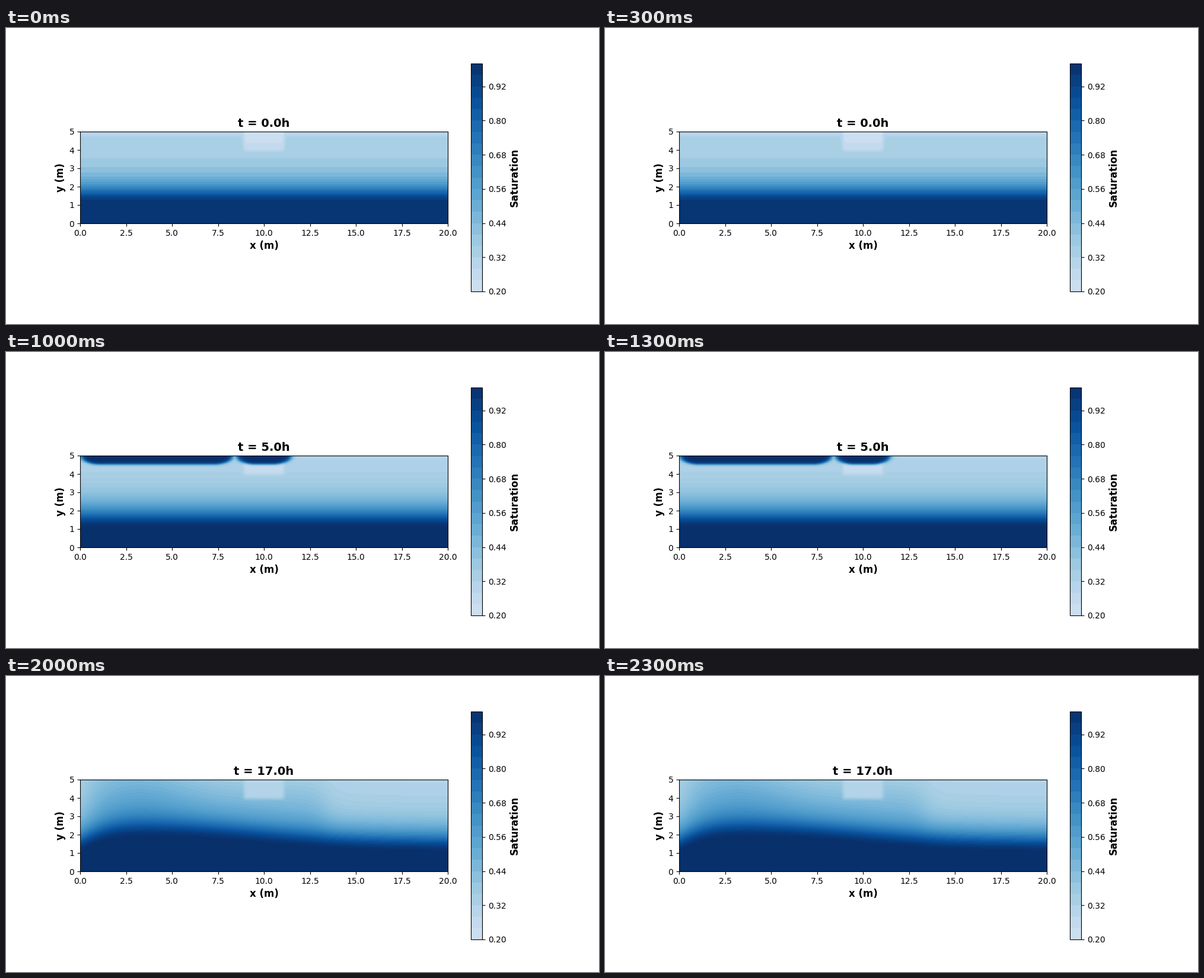
Recreate the animation shown at these times as a matplotlib script. Size 1000 by 500 pixels, loop 2.5 s.

```python
import numpy as np
import matplotlib.pyplot as plt
from matplotlib.animation import FuncAnimation

HOURS = [0, 2, 5, 12, 17]
COARSE = np.linspace(0.20, 1.00, 21)
FINE = np.arange(12, 64) * 0.016
RESIDUAL = 0.294

X, Y = np.meshgrid(np.linspace(0, 20, 401), np.linspace(0, 5, 201))


def step(v, centre, width):
    return 0.5 * (1 + np.tanh((v - centre) / width))


def bump(v, centre, width):
    return np.exp(-((v - centre) / width) ** 2)


def retention(rise=0.0, extra=0.0):
    """Saturation above a water table at 1 m + rise, with extra held water."""
    head = np.maximum(Y - 1 - rise, 0)
    effective = (1 + (0.86 * head) ** 2.2) ** -1.25
    base = RESIDUAL + extra
    return base + (1 - base) * effective


def with_trench(field, filling):
    """Blend in the coarse-grained block below the surface at mid-width."""
    side = np.clip((1.22 - np.abs(X - 10)) / 0.24, 0, 1)
    floor = np.clip((Y - 3.82) / 0.24, 0, 1)
    return field + (filling - field) * side * floor


def surface_drying():
    """Held water fades towards the surface, more so away from the inlet."""
    return 1 - (np.maximum(Y - 3, 0) / 2) ** 2 * (0.3 + 0.3 * step(X, 6, 2))


def wet_zone(centre, half_width, depth=0.46, corner=0.45, squeeze=0.45):
    """Rounded wetting front hanging from the surface, 0..1."""
    qx = (np.abs(X - centre) - half_width) * squeeze + corner
    qy = 5 - Y - depth + corner
    outside = np.hypot(np.maximum(qx, 0), np.maximum(qy, 0))
    distance = outside + np.minimum(np.maximum(qx, qy), 0) - corner
    return 1 - step(distance, 0, 0.08)


def dry(rise=0.0):
    return with_trench(retention(rise), 0.26 - 0.055 * (Y - 4))


def raining():
    wet = np.maximum(wet_zone(4.18, 4.1), wet_zone(10, 1.46))
    field = dry(0.02)
    return field + (1 - field) * wet


def sinking_plume():
    rise = 0.17 * bump(X, 6, 5) + 0.2 * bump(X, 10, 2.5)
    front = 13.1 - 0.5 * bump(Y, 2.3, 0.6)
    held = (0.12 + 0.13 * bump(X, 2, 3.2)) * step(X, 0.25, 0.35)
    held = held * (1 - step(X, front, 0.4)) * surface_drying()
    lens = 0.36 * step(X, 0.5, 0.5) * bump(X, 1.5, 4.8)
    d = Y - (2.3 + 0.75 * np.exp(-X / 6) + 0.35 * np.exp(-X / 0.6))
    above = held + lens / (1 + (d / 0.9) ** 2)
    below = (held + lens) * bump(d, 0, 0.47)
    field = retention(rise, np.where(d > 0, above, below))
    return with_trench(field, 0.30 + 0.02 * (5 - Y))


def raised_table():
    rise = 0.9 * np.tanh(X / 1.8) * (1 - step(X, 10, 5))
    held = (0.1 + 0.09 * bump(X, 3.2, 3.2)) * step(X, 0.3, 0.9)
    held = held * (1 - step(X, 13.3, 0.7)) * surface_drying()
    return with_trench(retention(rise, held), 0.30 + 0.02 * (5 - Y))


STATES = [(dry(), COARSE), (dry(0.02), COARSE), (raining(), FINE),
          (sinking_plume(), FINE), (raised_table(), FINE)]

fig, ax = plt.subplots(figsize=(10, 5), dpi=100)


def draw(i):
    for old in list(ax.collections):
        old.remove()
    field, levels = STATES[i]
    ax.set_title(f"t = {HOURS[i]:.1f}h", fontsize=14, fontweight="bold")
    return ax.contourf(X, Y, np.clip(field, 0.2001, 0.9999), levels=levels,
                       cmap="Blues", vmin=0, vmax=1)


bar = fig.colorbar(draw(0), ax=ax)
bar.set_label("Saturation", fontsize=12, fontweight="bold")
ax.set_xlabel("x (m)", fontsize=12, fontweight="bold")
ax.set_ylabel("y (m)", fontsize=12, fontweight="bold")
ax.set(xlim=(0, 20), ylim=(0, 5), aspect="equal")


def update(i):
    return [draw(i)]


anim = FuncAnimation(fig, update, frames=len(STATES), interval=500,
                     repeat=True, repeat_delay=0, blit=False)
plt.show()
```
